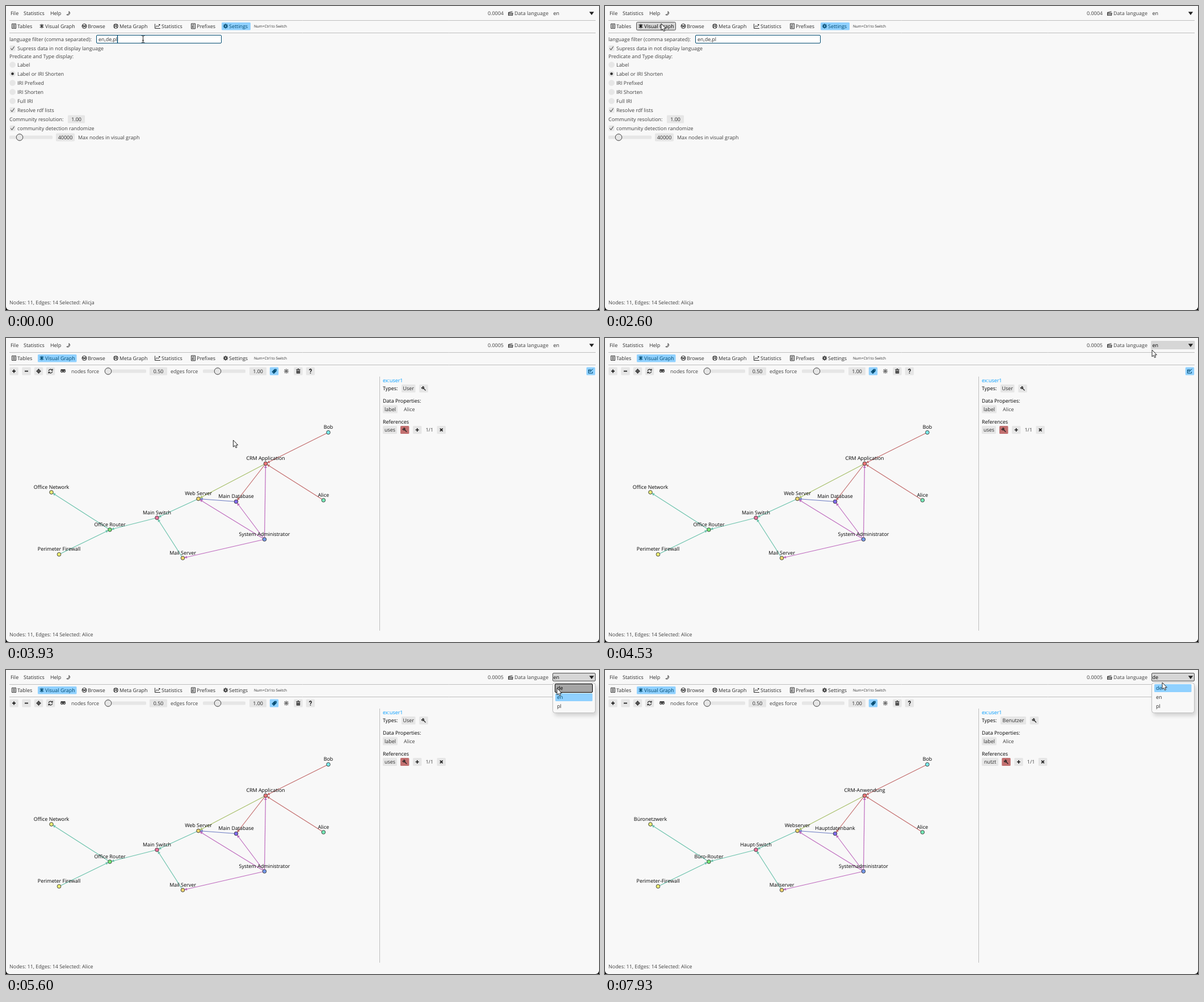
An HTML page with a canvas for the animation above (8 s loop, 1045 by 536 pixels).

```html
<!DOCTYPE html>
<html lang="en">
<head>
<meta charset="utf-8">
<title>Graph viewer</title>
<style>
html, body { margin: 0; height: 100%; overflow: hidden; background: #000; }
canvas { display: block; }
</style>
</head>
<body>
<canvas id="stage" width="1045" height="536"></canvas>
<script>
const ctx = document.getElementById('stage').getContext('2d');
ctx.textRendering = 'geometricPrecision';

const LOOP = 8000, STEP = 200 / 3;
const TEXT = '#3f3f3f', DARK = '#2c2c2c', BLUE = '#90d1ff', NAVY = '#004a70';
const IDLE = '#e6e6e6', HOVER = '#d6d6d6', PRESS = '#a5a5a5', RULE = '#bebebe', EDGE = '#505050';

const icons = {
  moon: 'M1-3.5A3.6 3.6 0 1 1-3.2 2.4Q1.8 2 1-3.5Z',
  table: 'M-3.5-4H3.5V4H-3.5ZM-2-2H2M-2 0H2M-2 2H2',
  flower: 'M0-3.8V3.8M-3.5-2L3.5 2M-3.5 2L3.5-2M-2-3.2L2 3.2M2-3.2L-2 3.2',
  globe: 'M-4 0a4 4 0 1 0 8 0a4 4 0 1 0-8 0M-3.5-2L0 0L3 3M0 0L3-2.5M0 0L-2 3M-4 0H4',
  meta: 'M-4 0a4 4 0 1 0 8 0a4 4 0 1 0-8 0M-2 3V-1L0 1.5L2-1V3M-3-2H3',
  chart: 'M-4.5-4V4H5M-3 2L-1-1L1 1L4-3M2-3H4V-1',
  prefix: 'M-3.5-4.5H3.5V4.5H-3.5ZM-2-2.5H2M-1.5 0H2M-1.5 2.5H2M-1.5-1V3',
  gear: 'M-2 0a2 2 0 1 0 4 0a2 2 0 1 0-4 0M0-4.2V-2M0 2V4.2M-4.2 0H-2M2 0H4.2M-3-3L-1.5-1.5M1.5 1.5L3 3M3-3L1.5-1.5M-1.5 1.5L-3 3',
  folder: 'M-4-1.5L3.5-3.2M-3.5-.5H4L3.5 3.5H-3.5ZM-3 1.5H3',
  plus: 'M-3 0H3M0-3V3',
  minus: 'M-3 0H3',
  target: 'M-2.6 0a2.6 2.6 0 1 0 5.2 0a2.6 2.6 0 1 0-5.2 0M-4.2 0H4.2M0-4.2V4.2',
  refresh: 'M-3.3-.5A3.4 3.4 0 0 1 2.7-2M3.5-4V-1.5H1M3.3.5A3.4 3.4 0 0 1-2.7 2M-3.5 4V1.5H-1',
  glasses: 'M-4-2.5H4M-3.8 0a1.7 1.7 0 1 0 3.4 0a1.7 1.7 0 1 0-3.4 0M.4 0a1.7 1.7 0 1 0 3.4 0a1.7 1.7 0 1 0-3.4 0',
  tag: 'M-3 1L1-3H3.5V-.5L-.5 3.5ZM-1.5 1L1.5-2M-.5 2L2.5-1',
  sun: 'M-1.4 0a1.4 1.4 0 1 0 2.8 0a1.4 1.4 0 1 0-2.8 0M0-4V-2.5M0 2.5V4M-4 0H-2.5M2.5 0H4M-3-3L-2-2M2 2L3 3M3-3L2-2M-2 2L-3 3',
  trash: 'M-3.5-3H3.5M-1-4H1M-2.5-2V3.5H2.5V-2M-.8-1.5V3M.8-1.5V3',
  help: 'M-1.8-1.5A1.8 1.8 0 1 1 .8-.2Q0 .3 0 1.6M0 2.6V4',
  wrench: 'M3.5 3.5L-1-1M-3.5-1.5A2 2 0 1 0-1.5-3.5L-1.5-1.5Z',
  cross: 'M-2.4-2.4L2.4 2.4M2.4-2.4L-2.4 2.4',
  edit: 'M1-2.5H-4V3.5H3V1M-4-.5H1M-2 1.5L4-4'
};

// id: x, y, fill, English label, German label
const nodes = {
  bob: [568, 166.5, '#79eded', 'Bob', 'Bob'],
  crm: [457.5, 221.5, '#f07474', 'CRM Application', 'CRM-Anwendung'],
  net: [80, 272, '#eaf075', 'Office Network', 'Büronetzwerk'],
  web: [339, 283.5, '#ecd56c', 'Web Server', 'Webserver'],
  db: [405.5, 288.5, '#8069ed', 'Main Database', 'Hauptdatenbank'],
  alice: [559.5, 286, '#75edb8', 'Alice', 'Alice'],
  sw: [266, 317, '#ef749f', 'Main Switch', 'Haupt-Switch'],
  router: [183, 338, '#77ed77', 'Office Router', 'Büro-Router'],
  admin: [455.5, 355, '#7599ec', 'System Administrator', 'Systemadministrator'],
  wall: [93.5, 381.5, '#eef071', 'Perimeter Firewall', 'Perimeter-Firewall'],
  mail: [311.5, 388, '#efd56e', 'Mail Server', 'Mailserver']
};
const edges = {
  '#c26a6a': 'bob-crm alice-crm crm-db',
  '#a7bf6a': 'crm-web',
  '#6a7ac2': 'db-web',
  '#6ac2ab': 'web-sw sw-router router-net wall-router mail-sw',
  '#be6abe': 'admin-crm admin-db admin-web admin-mail'
};

// time, x, y of the pointer
const path = [
  [0, 241, 58], [1467, 241, 58], [1733, 108, 36], [1933, 108, 36], [2133, 99, 31],
  [3533, 99, 31], [3667, 130, 62], [3800, 235, 130], [3933, 400, 180], [4067, 580, 195],
  [4200, 770, 150], [4333, 910, 72], [4400, 949, 42], [4533, 964, 21], [4733, 975, 15],
  [4933, 975, 15], [5267, 971, 32], [6600, 971, 32], [6667, 972, 32], [6867, 972, 32],
  [7000, 974, 31], [7267, 974, 31], [7333, 978, 27], [7467, 982, 22], [LOOP, 982, 22]
];
const counts = [[0, 4], [1600, 5], [2600, 4], [3067, 6], [3200, 5], [4800, 6], [5267, 5],
  [5733, 6], [7000, 5], [7333, 4], [7467, 5]];

const within = (t, a, b) => t >= a && t < b;

function pointer(t) {
  const i = path.findIndex(k => k[0] > t);
  const [t0, x0, y0] = path[i - 1], [t1, x1, y1] = path[i];
  const p = (t - t0) / (t1 - t0);
  return [x0 + (x1 - x0) * p, y0 + (y1 - y0) * p];
}

function text(s, x, y, color = TEXT, align = 'left', size = 8.95) {
  ctx.font = size + 'px "Open Sans", "Noto Sans", sans-serif';
  ctx.fillStyle = color;
  ctx.textAlign = align;
  ctx.fillText(s, x, y + size * 0.36);
}

function rect(x0, y0, x1, y1, fill, stroke, r = 1.5) {
  ctx.beginPath();
  ctx.roundRect(x0, y0, x1 - x0, y1 - y0, r);
  if (fill) { ctx.fillStyle = fill; ctx.fill(); }
  if (stroke) { ctx.strokeStyle = stroke; ctx.lineWidth = 1; ctx.stroke(); }
}

function disc(x, y, r, fill, stroke) {
  ctx.beginPath();
  ctx.arc(x, y, r, 0, 7);
  ctx.fillStyle = fill;
  ctx.fill();
  if (stroke) { ctx.strokeStyle = stroke; ctx.lineWidth = 1; ctx.stroke(); }
}

function line(x0, y0, x1, y1, color = RULE, w = 1) {
  ctx.beginPath();
  ctx.moveTo(x0, y0);
  ctx.lineTo(x1, y1);
  ctx.strokeStyle = color;
  ctx.lineWidth = w;
  ctx.stroke();
}

function icon(name, x, y, color = DARK, w = 1.1) {
  ctx.save();
  ctx.translate(x, y);
  ctx.strokeStyle = color;
  ctx.lineWidth = w;
  ctx.stroke(new Path2D(icons[name]));
  ctx.restore();
}

function button(label, x0, x1, y) {
  rect(x0, y - 7, x1, y + 7, IDLE);
  text(label, (x0 + x1) / 2, y, DARK, 'center');
}

function iconButton(name, x, y, fill = IDLE, color = '#222', w = 1.2) {
  rect(x - 7.7, y - 7, x + 7.7, y + 7, fill);
  icon(name, x, y, color, w);
}

function slider(x0, x1, knob, y) {
  rect(x0, y - 3, x1, y + 3, IDLE);
  disc(knob, y, 5.8, IDLE, TEXT);
}

function check(label, y) {
  rect(6.5, y - 5, 16.5, y + 5, IDLE);
  line(8.5, y, 10.5, y + 3, DARK);
  line(10.5, y + 3, 14.5, y - 3, DARK);
  text(label, 20, y);
}

function radio(label, y, on) {
  disc(11.5, y, 5.3, IDLE);
  if (on) disc(11.5, y, 2.3, DARK);
  text(label, 20, y);
}

function header(t, graph, lang) {
  text('File', 8, 13, DARK);
  text('Statistics', 31, 13, DARK);
  text('Help', 78, 13, DARK);
  icon('moon', 110, 13, DARK, 0.9);
  text('0.000' + counts.filter(c => c[0] <= t).pop()[1], 849, 13);
  icon('folder', 889, 13);
  text('Data language', 896, 13);

  const open = within(t, 4867, 5733) || t >= 7800;
  const down = within(t, 4800, 4867) || within(t, 7667, 7800);
  const over = within(t, 4533, 4800) || within(t, 7467, 7667);
  if (open || down) rect(963.5, 5.5, 1038.5, 19.5, down ? PRESS : HOVER, EDGE);
  else if (over) rect(962, 5, 1039.5, 20, HOVER);
  text(lang, 964.5, 13, open || down || over ? '#000' : DARK);
  ctx.fillStyle = '#222';
  ctx.fill(new Path2D('M1027.8 10.2H1036.2L1032 16Z'));

  line(6, 25.5, 1039, 25.5);
  line(6, 47.5, 1039, 47.5);
  const hover = within(t, 1733, 3600), press = within(t, 3067, 3133);
  if (graph) rect(56, 29, 124.5, 42.5, BLUE);
  else rect(380, 29, 431, 42.5, BLUE);
  if (hover) rect(55.5, 28.5, 124.5, 42.5, graph ? BLUE : press ? PRESS : HOVER, press ? '#000' : EDGE, 2);
  const tabs = [['table', 14, 'Tables', 20], ['flower', 63, 'Visual Graph', 69], ['globe', 138, 'Browse', 144],
    ['meta', 193.5, 'Meta Graph', 200], ['chart', 267, 'Statistics', 274], ['prefix', 330, 'Prefixes', 336],
    ['gear', 387, 'Settings', 393]];
  tabs.forEach(([name, ix, label, x], i) => {
    const on = i === (graph ? 1 : 6);
    const color = on ? NAVY : i === 1 && hover ? '#000' : DARK;
    icon(name, ix, 35.5, color, i === 6 ? 1.5 : 1);
    text(label, x, 35.5, color);
  });
  text('Num+Ctrl to Switch', 437, 35.5, DARK, 'left', 6.45);
}

function settings(t) {
  text('language filter (comma separated):', 6, 58.5);
  rect(159.5, 51.5, 379.5, 65.5, '#fff', NAVY);
  text('en,de,pl', 163, 58.5, DARK);
  const caret = t < 600 || within(t, 1133, 1667) || within(t, 2133, 2600) || t >= 3067;
  if (caret) line(196.5, 52, 196.5, 65, NAVY, 1.4);
  check('Supress data in not display language', 74.5);
  text('Predicate and Type display:', 6, 89);
  ['Label', 'Label or IRI Shorten', 'IRI Prefixed', 'IRI Shorten', 'Full IRI']
    .forEach((s, i) => radio(s, 103.5 + i * 16, i === 1));
  check('Resolve rdf lists', 183.5);
  text('Community resolution:', 6, 199.5);
  button('1.00', 109, 139, 199.5);
  check('community detection randomize', 215.5);
  slider(6, 82, 24, 231.5);
  button('40000', 88, 121, 231.5);
  text('Max nodes in visual graph', 127, 231.5);
}

function toolbar() {
  const y = 58.5;
  iconButton('plus', 14, y, IDLE, '#222', 1.8);
  iconButton('minus', 36, y, IDLE, '#222', 1.8);
  iconButton('target', 57.5, y);
  iconButton('refresh', 78.5, y);
  icon('glasses', 100.5, y, '#222', 1.3);
  text('nodes force', 115, y);
  slider(174, 247, 180, y);
  button('0.50', 253, 284, y);
  text('edges force', 290, y);
  slider(347, 422, 373, y);
  button('1.00', 429, 459, y);
  iconButton('tag', 472.5, y, BLUE, NAVY, 1.6);
  icon('sun', 494, y, '#222');
  iconButton('trash', 515, y);
  iconButton('help', 536.5, y, IDLE, '#222', 1.5);
  iconButton('edit', 1030.5, y, BLUE, NAVY, 1);
}

function arrow([x0, y0], [x1, y1], color) {
  const a = Math.atan2(y1 - y0, x1 - x0);
  line(x0, y0, x1, y1, color, 1.2);
  ctx.save();
  ctx.translate(x1, y1);
  ctx.rotate(a);
  ctx.fillStyle = color;
  ctx.fill(new Path2D('M-3 0L-7.5-2.5V2.5Z'));
  ctx.restore();
}

function graphView(german) {
  for (const color in edges)
    for (const pair of edges[color].split(' ')) {
      const [a, b] = pair.split('-');
      arrow(nodes[a], nodes[b], color);
    }
  for (const [x, y, fill, en, de] of Object.values(nodes)) {
    disc(x, y, 3.3, fill, '#444');
    text(german ? de : en, x, y - 9.5, '#000', 'center');
  }
}

function details(german) {
  line(658.5, 68, 658.5, 516);
  text('ex:user1', 664, 74.5, '#009bff');
  text('Types:', 664, 89, '#000');
  button(german ? 'Benutzer' : 'User', 697, german ? 742 : 721.5, 89);
  iconButton('wrench', german ? 756.5 : 736, 89);
  text('Data Properties:', 664, 111, '#000');
  button('label', 664, 690, 125.5);
  text('Alice', 701, 125.5);
  text('References', 664, 147.5, '#000');
  const dx = german ? 4.3 : 0, y = 162;
  button(german ? 'nutzt' : 'uses', 664, 689 + dx, y);
  iconButton('wrench', 702.7 + dx, y, '#c27070');
  iconButton('plus', 724.7 + dx, y, IDLE, '#222', 1.7);
  text('1/1', 739.5 + dx, y);
  iconButton('cross', 767.2 + dx, y, IDLE, '#222', 1.7);
}

function popup(t, lang) {
  const start = t >= 7800 ? 7800 : 4867;
  if (!within(t, start, start === 4867 ? 5733 : LOOP)) return;
  ctx.save();
  ctx.globalAlpha = Math.min(1, (t - start + STEP) / (2 * STEP));
  ctx.shadowColor = 'rgba(0,0,0,.16)';
  ctx.shadowBlur = 7;
  ctx.shadowOffsetX = 3;
  ctx.shadowOffsetY = 5;
  rect(963.5, 22.5, 1038.5, 75.5, '#f8f8f8', null, 4);
  ctx.shadowColor = 'transparent';
  rect(963.5, 22.5, 1038.5, 75.5, null, RULE, 4);
  ['de', 'en', 'pl'].forEach((s, i) => {
    const y = 32 + i * 16, on = s === lang;
    const press = i === 0 && within(t, 5600, 5733), over = i === 0 && within(t, 5133, 5600);
    if (on) rect(968, y - 7, 1033.5, y + 7, BLUE);
    else if (press || over) rect(967.5, y - 7.5, 1033.5, y + 7.5, press ? PRESS : HOVER, press ? '#000' : EDGE);
    text(s, 971, y, on ? NAVY : press || over ? '#000' : DARK);
  });
  ctx.restore();
}

function mouse(t) {
  const [x, y] = pointer(t);
  ctx.save();
  ctx.translate(x, y);
  if (t < 1600) {
    ctx.strokeStyle = '#222';
    ctx.lineWidth = 1;
    ctx.stroke(new Path2D('M-2-5.5Q.5-5.5.5-4V5Q.5 6.5-2 6.5M3-5.5Q.5-5.5.5-4M.5 5Q.5 6.5 3 6.5M-1 2.5H2'));
  } else {
    const shape = new Path2D('M0 0V12L2.7 9.5L4.6 13.6L6.5 12.7L4.8 8.8H8.3Z');
    ctx.fillStyle = '#fff';
    ctx.fill(shape);
    ctx.strokeStyle = '#222';
    ctx.lineWidth = 1;
    ctx.stroke(shape);
  }
  ctx.restore();
}

function draw() {
  const now = performance.now() % LOOP;
  const t = Math.min(Math.floor((now + 4) / STEP) * STEP, LOOP - 1);
  const graph = t >= 3133, german = t >= 5733, lang = german ? 'de' : 'en';
  ctx.clearRect(0, 0, 1045, 536);
  rect(0, 0, 1045, 536, '#f8f8f8', null, [0, 0, 6, 6]);
  header(t, graph, lang);
  if (graph) {
    toolbar();
    graphView(german);
    details(german);
  } else settings(t);
  text('Nodes: 11, Edges: 14 Selected: ' + (graph ? 'Alice' : 'Alicja'), 6, 523);
  popup(t, lang);
  mouse(t);
  requestAnimationFrame(draw);
}
draw();
</script>
</body>
</html>
```
